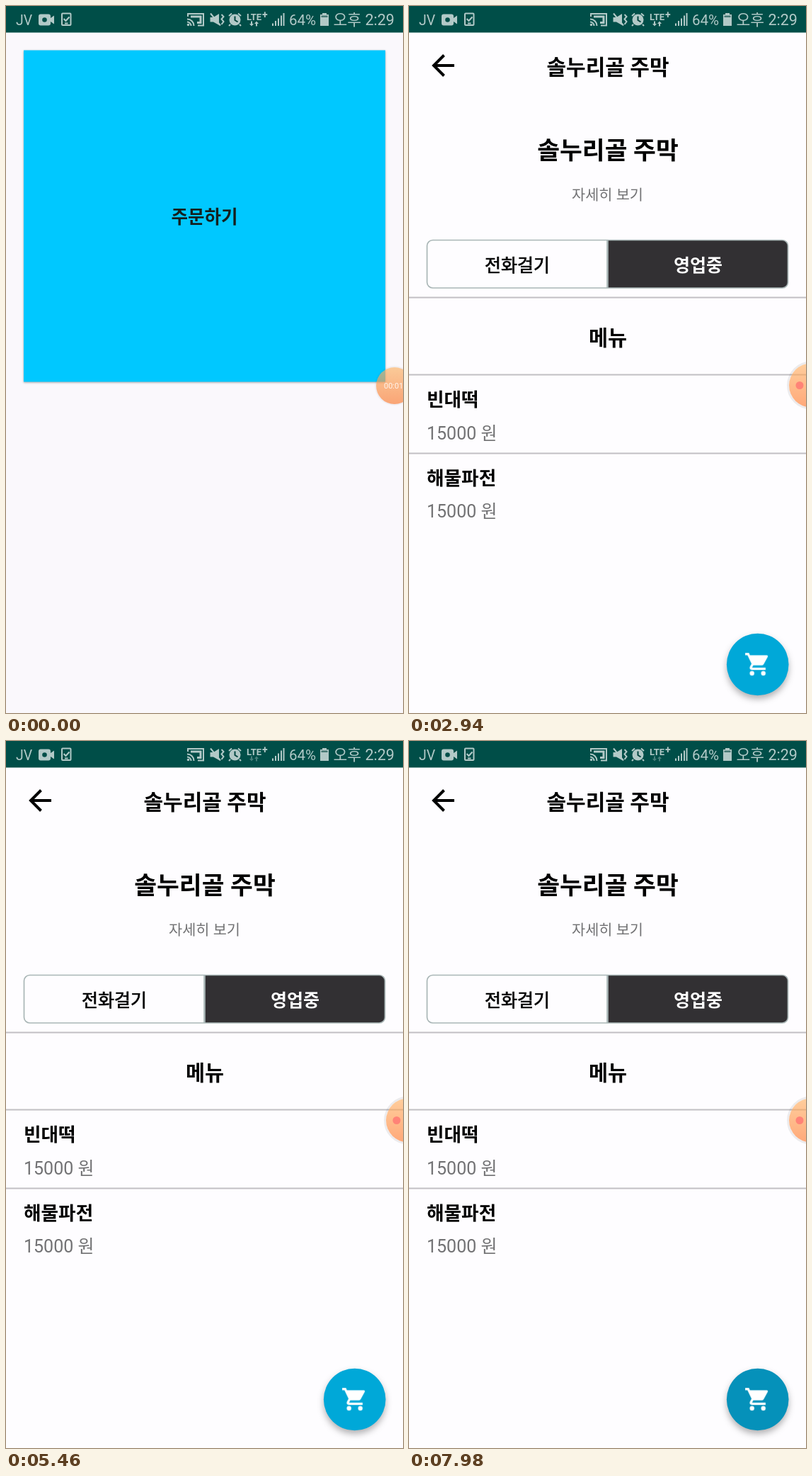
An HTML page that plays this animation: 561 by 998 pixels, repeating every 8 s.

```html
<!DOCTYPE html>
<html lang="ko">
<head>
<meta charset="utf-8">
<title>주문하기</title>
<style>
  html, body { margin: 0; width: 100%; height: 100%; overflow: hidden; background: #faf8fc; }
  svg { display: block; width: 100%; height: 100%; }
  text { font-family: Roboto, "Noto Sans CJK KR", "Noto Sans CJK", sans-serif; }
  .mid { text-anchor: middle; }
  .end { text-anchor: end; }
  .medium { fill: currentColor; stroke: currentColor; stroke-width: .7; }
  .bold { font-weight: 700; }
  .grey { fill: #727274; }
  .line { fill: none; stroke: currentColor; }

  /* One loop is 8 s, so 1% is 80 ms. */
  .step { animation: 8s step-end infinite; }
  .slide { animation: 8s linear infinite; }

  .home { animation-name: home; }
  .scrim { animation-name: scrim; }
  .shop { animation-name: shop; }
  @keyframes home {
    0%, 22.375% { transform: translateX(0); animation-timing-function: cubic-bezier(.333, 0, .667, 1); }
    27.125%, 100% { transform: translateX(-14px); }
  }
  @keyframes scrim {
    0%, 22.375% { opacity: 0; animation-timing-function: cubic-bezier(.333, 0, .667, 1); }
    27.125%, 100% { opacity: .1; }
  }
  @keyframes shop {
    0%, 22.375% { transform: translateX(561px); animation-timing-function: cubic-bezier(.333, 0, .667, 1); }
    27.125%, 100% { transform: translateX(0); }
  }

  .loaded { animation-name: loaded; }
  @keyframes loaded { 0% { opacity: 0 } 36.75%, 100% { opacity: 1 } }

  .dim { animation-name: dim; }
  @keyframes dim {
    0% { opacity: 0 }
    51% { opacity: .4 } 51.75% { opacity: .7 }
    65.25% { opacity: .6 } 66.75% { opacity: .43 } 67.5% { opacity: .2 } 68.25% { opacity: 0 }
    76.5% { opacity: .7 }
    86.25% { opacity: .44 } 87% { opacity: .2 } 87.75%, 100% { opacity: 0 }
  }
  .modal { animation-name: modal; }
  @keyframes modal {
    0% { opacity: 0 }
    51% { opacity: .98 } 51.75% { opacity: 1 }
    65.25% { opacity: .995 } 66.75% { opacity: .14 } 67.5% { opacity: .05 } 68.25% { opacity: 0 }
    76.5% { opacity: 1 }
    86.25% { opacity: .14 } 87% { opacity: .05 } 87.75%, 100% { opacity: 0 }
  }

  .one { animation-name: one; }
  .two { animation-name: two; }
  .dish-a { animation-name: dish-a; }
  .dish-b { animation-name: dish-b; }
  @keyframes one { 0% { opacity: 1 } 61.5% { opacity: 0 } 76.5%, 100% { opacity: 1 } }
  @keyframes two { 0% { opacity: 0 } 61.5% { opacity: 1 } 76.5%, 100% { opacity: 0 } }
  @keyframes dish-a { 0% { opacity: 1 } 76.5%, 100% { opacity: 0 } }
  @keyframes dish-b { 0% { opacity: 0 } 76.5%, 100% { opacity: 1 } }

  .fab { fill: #00a8d8; animation-name: fab; }
  @keyframes fab { 0% { fill: #00a8d8 } 99% { fill: #039cc9 } 99.75%, 100% { fill: #0591ba } }

  .timer { animation-name: timer; }
  .recorder { animation-name: recorder; }
  @keyframes timer { 0% { opacity: 1 } 23.25%, 100% { opacity: 0 } }
  @keyframes recorder { 0% { opacity: 0 } 23.25%, 100% { opacity: 1 } }
  .tick1 { animation-name: tick1; }
  .tick2 { animation-name: tick2; }
  .tick3 { animation-name: tick3; }
  .tick4 { animation-name: tick4; }
  @keyframes tick1 { 0% { opacity: 1 } 2.25%, 100% { opacity: 0 } }
  @keyframes tick2 { 0% { opacity: 0 } 2.25% { opacity: 1 } 10.5%, 100% { opacity: 0 } }
  @keyframes tick3 { 0% { opacity: 0 } 10.5% { opacity: 1 } 18.75%, 100% { opacity: 0 } }
  @keyframes tick4 { 0% { opacity: 0 } 18.75%, 100% { opacity: 1 } }

  .down { animation-name: down; }
  .up { animation-name: up; }
  @keyframes down { 0% { opacity: 1 } 51.75% { opacity: .4 } 80.25% { opacity: 1 } 87%, 100% { opacity: .4 } }
  @keyframes up { 0% { opacity: 1 } 51.75%, 100% { opacity: .4 } }

  .card { filter: drop-shadow(0 1px 1.5px rgba(0, 0, 0, .35)); }
  .raised { filter: drop-shadow(0 5px 5px rgba(0, 0, 0, .3)); }
  .floating { filter: drop-shadow(0 10px 11px rgba(0, 0, 0, .38)); }
</style>
</head>
<body>
<svg viewBox="0 0 561 998" preserveAspectRatio="none">
  <defs>
    <linearGradient id="peach" x1="0" y1="0" x2="0" y2="1">
      <stop offset="0" stop-color="#ffb567"/>
      <stop offset="1" stop-color="#ff7c32"/>
    </linearGradient>
    <clipPath id="pill"><rect x="25.5" y="330.5" width="510" height="67.5" rx="8"/></clipPath>
  </defs>

  <rect width="561" height="998" fill="#faf8fc"/>
  <g class="slide home">
    <rect class="card" x="25" y="62.5" width="511" height="468" fill="#00c8ff"/>
    <text class="mid bold" x="280.5" y="307" font-size="25.6" fill="#14201f">주문하기</text>
  </g>
  <rect class="slide scrim" width="561" height="998"/>

  <g class="slide shop">
    <rect width="561" height="998" fill="#fefdff"/>
    <path class="line" d="M64 84H35M49.5 69.5L35 84L49.5 98.5" stroke-width="4"/>
    <text class="mid grey" x="280.5" y="274" font-size="20.8">자세히 보기</text>
    <text class="mid medium" x="153" y="374.5" font-size="25">전화걸기</text>
    <text class="mid medium" x="408.5" y="374.5" font-size="25">영업 준비중</text>

    <g class="step loaded">
      <text class="mid bold" x="281" y="97" font-size="30">솔누리골 주막</text>
      <text class="mid bold" x="281" y="216" font-size="34.6">솔누리골 주막</text>
      <rect x="281" y="330" width="256" height="69" fill="#323033" clip-path="url(#pill)"/>
      <text class="mid bold" x="408.5" y="374.5" font-size="25" fill="#fff">영업중</text>
      <path d="M0 411.5H561M0 520.5H561M0 631.5H561" stroke="#c1c0c4" stroke-width="2"/>
      <text class="mid bold" x="281" y="479" font-size="29.4">메뉴</text>
      <g class="bold" font-size="26.7">
        <text x="25" y="565">빈대떡</text>
        <text x="25" y="676">해물파전</text>
      </g>
      <g class="grey" font-size="25">
        <text x="25" y="611.5">15000 원</text>
        <text x="25" y="722">15000 원</text>
      </g>
    </g>

    <g class="line" color="#a9b6b6">
      <rect x="25.5" y="330.5" width="510" height="67.5" rx="8" stroke-width="1.7"/>
      <path d="M280.5 331V398" stroke-width="2.6"/>
    </g>

    <g class="raised"><circle class="step fab" cx="492.7" cy="929.5" r="43.8"/></g>
    <g transform="translate(473.5 910) scale(1.6)" fill="#fff">
      <path d="M1 2H4.3L5.2 4H20Q21.4 4.2 20.9 5.5L17.3 12Q16.7 13 15.5 13H8.1L7.2 14.6Q7.1 15 7.4 15H19V17H7Q4.2 16.5 5.2 14L6.6 11.6L3 4H1Z"/>
      <circle cx="7" cy="20" r="2"/><circle cx="17" cy="20" r="2"/>
    </g>
  </g>

  <rect width="561" height="37.5" fill="#004e48"/>
  <rect class="step dim" width="561" height="998" fill="#030005"/>

  <g class="step modal">
    <rect class="floating" x="39" y="355" width="483" height="325" rx="3" fill="#fefdff"/>
    <text class="mid bold" x="280.5" y="410.5" font-size="27">주문하기</text>
    <g font-size="24.4">
      <text class="step dish-a" x="64" y="482">빈대떡</text>
      <text class="step dish-b" x="64" y="482">해물파전</text>
      <text class="end" x="497" y="482">+15000원</text>
    </g>
    <text class="bold" x="64" y="544.5" font-size="26.7">수량</text>
    <g class="line" stroke-width="3">
      <circle cx="313.5" cy="533.5" r="14.5"/>
      <circle cx="478.5" cy="533.5" r="14.5"/>
      <path d="M306 533.5H321M471 533.5H486M478.5 526V541"/>
    </g>
    <rect class="raised" x="51" y="589.5" width="459" height="78" rx="6" fill="#00a8d8"/>
    <g class="step one bold">
      <text class="mid" x="396" y="544" font-size="27">1</text>
      <text class="mid" x="280.5" y="639.5" font-size="26.7" fill="#fff">1개 담기</text>
      <text class="end" x="485" y="638.5" font-size="23.2" fill="#fff">15000원</text>
    </g>
    <g class="step two bold">
      <text class="mid" x="396" y="544" font-size="27">2</text>
      <text class="mid" x="280.5" y="639.5" font-size="26.7" fill="#fff">2개 담기</text>
      <text class="end" x="485" y="638.5" font-size="23.2" fill="#fff">30000원</text>
    </g>
  </g>

  <!-- status bar contents stay bright above the dimmed page -->
  <g fill="#fff" color="#fff" opacity=".7">
    <text x="14" y="27" font-size="19.5">JV</text>
    <path fill-rule="evenodd" d="M49 11.5H60Q63 11.5 63 14.5V17L68 13.5V25.5L63 22V24.5Q63 27.5 60 27.5H49Q46 27.5 46 24.5V14.5Q46 11.5 49 11.5ZM54.5 16.2A3.3 3.3 0 1 0 54.5 22.8A3.3 3.3 0 1 0 54.5 16.2Z"/>
    <g class="line" stroke-width="2">
      <rect x="79" y="10.5" width="12.5" height="16.5" rx="1"/>
      <path d="M81.5 18L84.5 21L89.5 15.5M83 24.5H87.5"/>
      <path d="M257 15V11H279V27.5H271M256 18.5A9.5 9.5 0 0 1 265.5 28M256 22.5A5.5 5.5 0 0 1 261.5 28"/>
      <path d="M261 15H275V23.5H270" stroke-width="3"/>
      <path d="M289 10.5L303 27.5M304.5 12L307.5 15L304.5 18.5L307.5 22L304.5 26"/>
      <path d="M315 14L319 10.5M332 14L328 10.5M317 26L315 28M330 26L332 28"/>
    </g>
    <circle cx="257.5" cy="26.5" r="1.7"/>
    <path d="M288.5 16H293L301 11V27L293 22.5H288.5Z"/>
    <circle cx="323.5" cy="19.5" r="8"/>
    <path class="line" d="M323.5 14.5V20L327.5 22.5" color="#00403b" stroke-width="2"/>
    <text x="340" y="19.5" font-size="13" class="bold">LTE</text>
    <text x="362" y="16.5" font-size="14" class="bold">+</text>
    <path class="step down" d="M346 21.5H348V25H350L347 28.5L344 25H346Z"/>
    <path class="step up" d="M353 28.5H355V25H357L354 21.5L351 25H353Z"/>
    <path d="M376 24.5H378V28H376ZM380 21H382V28H380ZM384 17.5H386V28H384ZM388 13.5H390V28H388ZM391.5 10H393.5V28H391.5Z"/>
    <text x="400" y="27" font-size="20.5">64%</text>
    <path d="M447 10H453V12H456V28H444V12H447Z"/>
    <path d="M445.5 13.5H454.5V16H445.5Z" fill="#00403b" opacity=".6"/>
    <text x="462.5" y="27" font-size="21.5">오후 2:29</text>
  </g>

  <g class="step timer">
    <circle cx="549" cy="536" r="28" opacity=".04"/>
    <circle cx="549" cy="536" r="26" fill="url(#peach)" opacity=".65"/>
    <g font-size="11" fill="#fff" opacity=".85">
      <text class="step tick1" x="534" y="540">00:01</text>
      <text class="step tick2" x="534" y="540">00:02</text>
      <text class="step tick3" x="534" y="540">00:03</text>
      <text class="step tick4" x="534" y="540">00:04</text>
    </g>
  </g>
  <g class="step recorder">
    <circle class="line" cx="568" cy="535.5" r="32.5" stroke-width="3" opacity=".07"/>
    <g opacity=".65">
      <circle cx="568" cy="535.5" r="31" fill="url(#peach)"/>
      <circle cx="552" cy="535.5" r="5.5" fill="#ff432e"/>
    </g>
  </g>
</svg>
</body>
</html>
```
